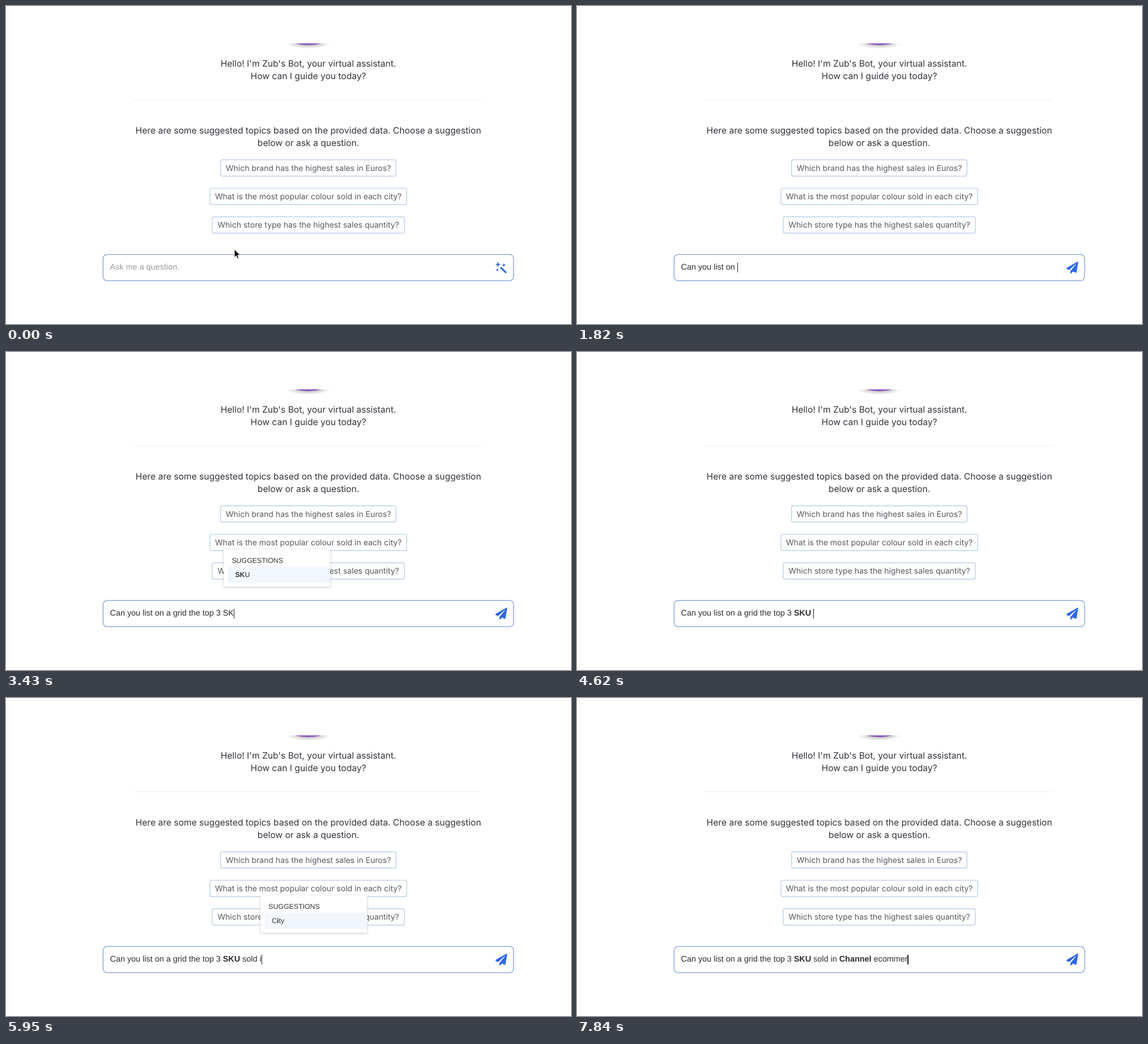
An HTML page that plays this animation: 997 by 561 pixels, repeating every 8000 ms.

```html
<!DOCTYPE html>
<html lang="en">
<head>
<meta charset="utf-8">
<title>Chat assistant</title>
<style>
  html, body { margin: 0; width: 100%; height: 100%; overflow: hidden; background: #fff; }
  body { position: relative; text-rendering: geometricPrecision; font-family: "Liberation Sans", Arial, sans-serif; }
  svg { position: absolute; left: 0; top: 0; }
  text { font-family: Inter, sans-serif; text-anchor: middle; }
  .intro { font-size: 15.6px; fill: #2f333b; }
  .chip text { font-size: 14px; fill: #565a60; }
  .chip rect { fill: #fff; stroke: #b4c8e8; stroke-width: 1.2; }
  #line {
    position: absolute; left: 183.5px; top: 452.5px;
    font-size: 14.4px; line-height: 16px; white-space: pre; color: #2d2d2f;
  }
  #line.empty { color: #999; }
  #caret { position: absolute; top: 0; width: 1.2px; height: 17px; background: #222; }
  #popup {
    position: absolute; bottom: 147.5px; width: 188.5px; max-height: 250px;
    box-sizing: border-box; padding-bottom: 7px; overflow: hidden;
    background: #fff; border-radius: 2px; box-shadow: 0 1px 4px rgba(0, 0, 0, .24);
    font-size: 12.35px; color: #333;
  }
  #popup div { margin-left: 8.5px; padding-left: 12px; height: 28px; line-height: 28px; }
  #popup .head { margin: 0; padding: 5px 0 0 14.5px; height: 25.5px; line-height: 30px; }
  #popup .head + div { background: #f2f6fe; }
</style>
</head>
<body>
<svg width="997" height="561" viewBox="0 0 997 561">
  <defs>
    <radialGradient id="shade">
      <stop offset="0" stop-color="#555" stop-opacity=".6"/>
      <stop offset=".55" stop-color="#777" stop-opacity=".3"/>
      <stop offset="1" stop-color="#999" stop-opacity="0"/>
    </radialGradient>
    <clipPath id="below"><rect y="66" width="997" height="20"/></clipPath>
  </defs>
  <g clip-path="url(#below)">
    <ellipse cx="533.5" cy="66" rx="40" ry="9.5" fill="url(#shade)"/>
    <path d="M510 66Q533.5 71.5 557 66Z" fill="#8a48bd"/>
  </g>

  <g class="intro">
    <text x="533.5" y="106.5">Hello! I'm Zub's Bot, your virtual assistant.</text>
    <text x="533.5" y="129.3">How can I guide you today?</text>
    <text x="533.5" y="224.5">Here are some suggested topics based on the provided data. Choose a suggestion</text>
    <text x="533.5" y="247.3">below or ask a question.</text>
  </g>
  <path d="M224 165.5H840" stroke="#efefef"/>

  <g class="chip">
    <rect x="378.7" y="271.3" width="309.4" height="28.8" rx="3"/>
    <text x="533.5" y="291">Which brand has the highest sales in Euros?</text>
    <rect x="360" y="321.5" width="347" height="28.8" rx="3"/>
    <text x="533.5" y="341.2">What is the most popular colour sold in each city?</text>
    <rect x="364" y="371.8" width="339" height="28.8" rx="3"/>
    <text x="533.5" y="391.4">Which store type has the highest sales quantity?</text>
  </g>

  <rect x="171.3" y="438.4" width="724.4" height="46.2" rx="7" fill="#fff" stroke="#7ba0d8" stroke-width="1.3"/>

  <g id="idle" fill="#2f67d8">
    <path d="M872.8 461L882.6 470.6" stroke="#2f67d8" stroke-width="3"/>
    <path d="M868 451.2l1.3 3.5 3.5 1.3-3.5 1.3-1.3 3.5-1.3-3.5-3.5-1.3 3.5-1.3z"/>
    <path d="M878.5 453.8l.9 2.3 2.3.9-2.3.9-.9 2.3-.9-2.3-2.3-.9 2.3-.9z"/>
    <path d="M867 462.8l.8 2 2 .8-2 .8-.8 2-.8-2-2-.8 2-.8z"/>
    <path d="M403 429.3v14.4l3.3-3.1 2.2 5.1 2.4-1-2.2-5h4.6z" fill="#111" stroke="#fff" stroke-width=".9"/>
  </g>
  <path id="send" fill="#2f68e6" transform="translate(863.4 451)"
    d="M19.5.2L.6 11.1Q-.6 12.2.7 12.9L5 14.7 16.7 4.3Q17.3 4.3 17.1 4.7L7.2 16.7V20Q7.7 21.7 9 20.6L11.6 17.5 16.7 19.6Q17.8 19.8 18 18.8L21 1.1Q20.8-.3 19.5.2Z"/>
</svg>
<div id="line"><span id="done"></span><span id="word"></span><i id="caret"></i></div>
<div id="popup"></div>

<script>
const LOOP = 8000;
const FIELDS = ["Season", "SKU", "Sales Euros", "Sales Area", "Store", "Store Type", "Shoe Style",
  "Shape", "Channel", "City", "Colour", "Brand", "Model Name", "Gender"];
const LIST = "Can you list on ";
const TOP = LIST + "a grid the top 3 ";
const SOLD = TOP + "SKU sold ";
const LAST = SOLD + "in Channel ";

// [start ms, typed text, suggestions open, caret opacity]
const STEPS = [
  [0, "", 0, 0],
  [630, "C"], [700, "C", 1], [840, "Ca"], [980, "Can"], [1120, "Can "],
  [1330, "Can y"], [1400, "Can yo"], [1470, "Can you"], [1540, "Can you l"], [1610, "Can you li"],
  [1680, "Can you list"], [1750, "Can you list o"], [1820, LIST],
  [1890, LIST + "a"], [1960, LIST + "a", 1], [2100, LIST + "a "], [2240, LIST + "a gr"],
  [2380, LIST + "a grid "], [2520, LIST + "a grid th"], [2660, LIST + "a grid the "],
  [2800, LIST + "a grid the to"], [2870, LIST + "a grid the top"],
  [2940, LIST + "a grid the top "], [3080, TOP],
  [3220, TOP + "S"], [3290, TOP + "S", 1], [3430, TOP + "SK", 1], [3640, TOP + "SKU "],
  [3850, TOP + "SKU ", 0, .5], [3920, TOP + "SKU ", 0, 0],
  [4270, TOP + "SKU ", 0, .5], [4340, TOP + "SKU "],
  [4690, TOP + "SKU ", 0, .5], [4760, TOP + "SKU ", 0, 0],
  [4970, TOP + "SKU s"], [5040, TOP + "SKU s", 1], [5320, TOP + "SKU so", 1],
  [5460, TOP + "SKU sol"], [5600, TOP + "SKU sold"], [5740, SOLD],
  [5880, SOLD + "i"], [5950, SOLD + "i", 1], [6160, SOLD + "in"], [6230, SOLD + "in "],
  [6440, SOLD + "in C"], [6580, SOLD + "in CH"], [6720, SOLD + "in CH", 1],
  [7000, SOLD + "in CH", 1, .5], [7070, SOLD + "in CH", 1, 0], [7140, LAST],
  [7350, LAST + "e"], [7420, LAST + "e", 1], [7490, LAST + "ec"], [7630, LAST + "ecom"],
  [7770, LAST + "ecomme"], [7840, LAST + "ecommer"]
];

const el = id => document.getElementById(id);
const [line, done, word, caret, popup] = ["line", "done", "word", "caret", "popup"].map(el);

function suggest(query) {
  const match = new RegExp(query, "i");
  const rows = FIELDS.filter(name => match.test(name))
    .map(name => `<div>${name.replace(match, "<b>$&</b>")}</div>`);
  popup.innerHTML = '<div class="head">SUGGESTIONS</div>' + rows.join("");
  popup.style.left = word.getBoundingClientRect().left + 1.2 + "px";
}

function show([, text, open = 0, opacity = 1]) {
  const cut = text.lastIndexOf(" ") + 1;
  done.innerHTML = text.slice(0, cut).replace(/SKU|Channel/g, "<b>$&</b>");
  word.textContent = text ? text.slice(cut) : "Ask me a question.";
  line.className = text ? "" : "empty";
  caret.style.opacity = opacity;
  el("idle").style.display = text ? "none" : "";
  el("send").style.display = text ? "" : "none";
  popup.style.display = open ? "" : "none";
  if (open) suggest(text.slice(cut));
}

let current;
function tick() {
  const time = performance.now() % LOOP;
  const step = STEPS.findLast(([start]) => start <= time);
  if (step !== current) show(current = step);
  requestAnimationFrame(tick);
}
tick();
</script>
</body>
</html>
```
